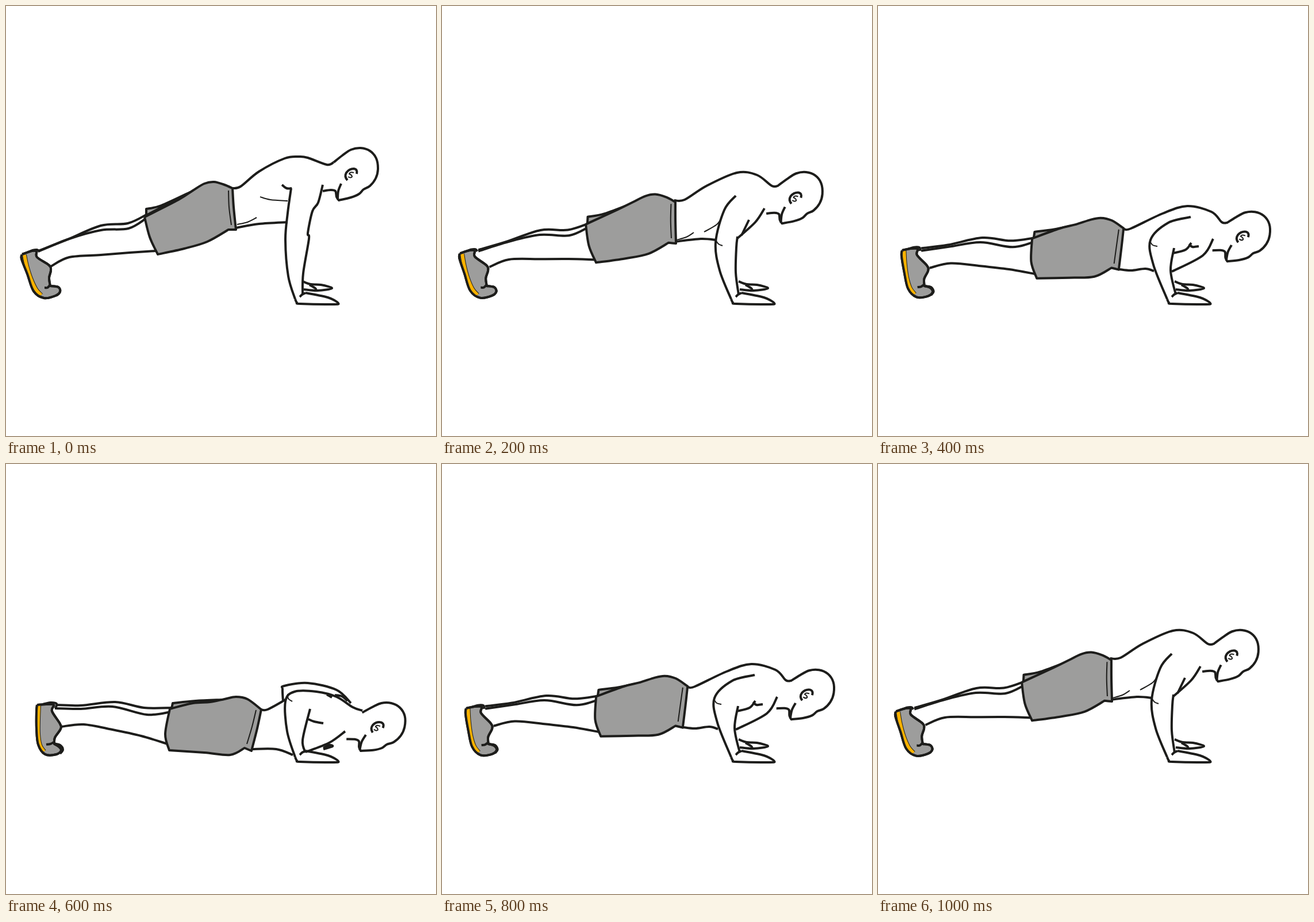
Animation of 748 by 748 pixels, one loop 1.2 s. Source, as an HTML page:

```html
<!DOCTYPE html>
<html lang="en">
<head>
<meta charset="utf-8">
<title>Push-up</title>
<style>
  html, body { margin: 0; width: 100%; height: 100%; overflow: hidden; background: #fff; }
  svg { display: block; width: 100%; height: 100%; fill: none; stroke: #1d1d1b; stroke-width: 4; stroke-linejoin: round; }
  g { visibility: inherit; }
  .grey { fill: #9d9d9c; }
  .thin { stroke-width: 2; }
  .soleEdge { stroke-width: 8; }
  .sole { stroke: #f9b200; stroke-width: 6; }
</style>
</head>
<body>
<svg id="stage" viewBox="0 0 748 748"></svg>
<script>
// Outlines are smooth curves through points; ";" marks a sharp corner.
// Lower body: each part is given raised and lowered, and blended between.
const legs = [
  ['56,427 110,405 165,390 213,387 243,370', '85,425 130,426 185,422 245,436 287,431'],
  ['56,426 105,407 165,382 212,378 246,362', '85,419 130,420 190,414 240,424 290,424'],
  ['78,453 110,437 165,433 215,429 260,426', '96,457 135,453 185,462 235,473 281,487']
];
const farShoe = [
  ['40,428 46,425 54,424 58,427', '64,418 77,415 88,417 86,425'],
  ['80,488 90,489 94,496 90,502', '83,486 94,489 99,497 94,504']
];
const shoe = [
  '28,432 45,426 53,427 54,437 75,451 78,460 75,473 77,487; 91,489 94,497 86,504 66,508 48,496 37,466 27,440 28,432',
  '54,419 70,418 83,419 80,430 94,452 95,461 85,476 84,487; 91,491 96,498 88,505 68,505 56,488 53,460 53,430 54,419'
];
const sole = ['32,433 36,452 43,474 52,493 61,503', '57,420 56,445 56,470 59,489 66,500'];
const shoeMark = ['67,490 72,490 76,486', '70,488 77,487 83,484'];
const farShorts = ['244,364; 244,353; 270,347 320,324; 244,364', '287,430; 290,416; 330,412 375,410; 287,430'];
const shorts = [
  '241,367 300,337 325,321 345,309 362,306 380,311 394,317; 396,350 400,389; 387,389; 350,410 310,422 264,432; 250,402 241,367',
  '285,426 325,416 355,414 380,409 400,405 420,409 444,427; 437,460 427,499; 415,494; 390,506 345,502 284,498; 277,470 285,426'
];
const waistband = ['387,321 388,350 392,381', '435,428 428,457 419,487'];

// The head is rigid and turns about the chin.
const chin = ['579,338', '617,499'];
const head = [
  '-9,-66 6,-78 21,-88 38,-91 54,-86 65,-73 68,-54 64,-38 54,-25 43,-19 35,-11 21,-5 0,0; -4,-6 -6,-16 -14,-18 -28,-16',
  '4,-29 -1,-16 -2,-1'
];
const ear = '<g transform="translate(21,-45)"><path d="M-6,10Q-12,4 -8,-3Q-3,-10 5,-10Q12,-9 10,-1"/>' +
  '<path class="thin" d="M5,-3Q-2,-5 -3,-1Q2,1 2,4Q0,7 -5,4"/></g>';

const hand = ['503,510 506,516 512,518 568,519 578,517 560,507 521,499', '511,506 515,502 521,499'];
const farHand = ['516,479 530,484 548,485 567,491 542,495 518,493', '528,485 538,491 540,495'];

const poses = [
  {
    t: 0,
    body: [
      '393,317 408,314 440,288 485,265 510,262 525,264 558,276 570,272', '400,386 440,379 490,376',
      '496,317 490,360 486,407 491,470 503,510', '480,311 488,317 497,317',
      '551,311 543,342 533,357 525,395 527,405 517,465 516,502', ...farHand
    ],
    thin: ['442,332 460,337 490,339', '402,380 420,376 436,368']
  },
  {
    t: 0.25,
    body: [
      '404,338 422,337 460,313 513,290 548,294 574,313 586,312', '405,410 450,405 477,407',
      '511,330 491,355 476,411 483,460 503,510', '514,401 512,420 511,464 516,502',
      '561,352 545,376 514,404', '534,372 521,399', ...farHand
    ],
    thin: ['476,407 481,414 488,417', '487,367 478,380 456,393', '408,407 425,402 438,394']
  },
  {
    t: 0.66,
    body: [
      '428,388 440,387 495,361 538,348 580,358 598,376 607,377', '420,458 440,460 465,457 480,461',
      '544,367 505,377 474,407 479,450 503,510', '515,421 509,460 518,502',
      '583,405 565,434 511,462', '513,430 535,424 545,412', '541,414 547,419 558,418', ...farHand
    ],
    thin: ['474,411 478,416 486,418']
  },
  {
    t: 1,
    body: [
      '443,427 455,427 486,410', '482,413 481,392 484,386 525,381 575,393 600,416',
      '503,510 489,465 486,413 502,396 540,396 575,405 603,423 620,429', '529,426 516,480 521,502',
      '526,444 536,448 552,451', '590,465 562,485 521,501', '558,401 567,406', '572,402 584,404 594,412',
      '552,494 562,489 568,491 552,496', '428,496 470,496 499,506'
    ],
    thin: ['490,400 491,408 498,413']
  }
];

const parse = text => text.split(';').map(run => run.trim().split(' ').map(p => p.split(',').map(Number)));

// Blend two outlines; sway bows the motion outwards, more so towards the head
function mix([up, down], t, sway = 0) {
  const low = parse(down);
  return parse(up).map((run, i) => run.map(([x, y], j) => {
    const [x2, y2] = low[i][j];
    return [x + (x2 - x) * t + sway * Math.sin(Math.PI * t) * (x - 290) / 60, y + (y2 - y) * t];
  }));
}

// Catmull-Rom spline as cubic Béziers
function curve(runs) {
  let last = runs[0][0], d = 'M' + last;
  runs.forEach((run, n) => {
    const p = n ? [last, ...run] : run;
    for (let i = 0; i < p.length - 1; i++) {
      const a = p[i], b = p[i + 1], before = p[i - 1] || a, after = p[i + 2] || b;
      const c1 = a.map((v, k) => v + (b[k] - before[k]) / 6);
      const c2 = b.map((v, k) => v - (after[k] - a[k]) / 6);
      d += `C${c1} ${c2} ${b}`;
    }
    last = p[p.length - 1];
  });
  return d;
}

const path = (runs, cls = '') => `<path class="${cls}" d="${curve(runs)}"/>`;
const lines = (list, cls) => list.map(text => path(parse(text), cls)).join('');

function figure({ t, body, thin }) {
  const foot = t ** 1.5, hip = t ** 1.1;
  const onFoot = (part, cls) => path(mix(part, foot), cls);
  const onHip = (part, cls) => path(mix(part, hip, 1), cls);
  return '<g>' +
    legs.map(leg => path(mix(leg, t))).join('') +
    farShoe.map(part => onFoot(part, 'grey')).join('') +
    onFoot(shoe, 'grey') + onFoot(sole, 'soleEdge') + onFoot(sole, 'sole') + onFoot(shoe) + onFoot(shoeMark) +
    lines(body) + lines(thin, 'thin') + lines(hand) +
    onHip(farShorts, 'grey') + onHip(shorts, 'grey') + onHip(waistband, 'thin') +
    `<g transform="translate(${mix(chin, t, 0.85)}) rotate(${10 * t})">${lines(head)}${ear}</g></g>`;
}

const stage = document.getElementById('stage');
stage.innerHTML = poses.map(figure).join('');
const figures = [...stage.children];
const start = performance.now();

function draw() {
  const step = Math.floor((performance.now() - start) / 200) % 6;
  const shown = 3 - Math.abs(3 - step);
  figures.forEach((g, i) => g.style.visibility = i === shown ? 'visible' : 'hidden');
  requestAnimationFrame(draw);
}
draw();
</script>
</body>
</html>
```
